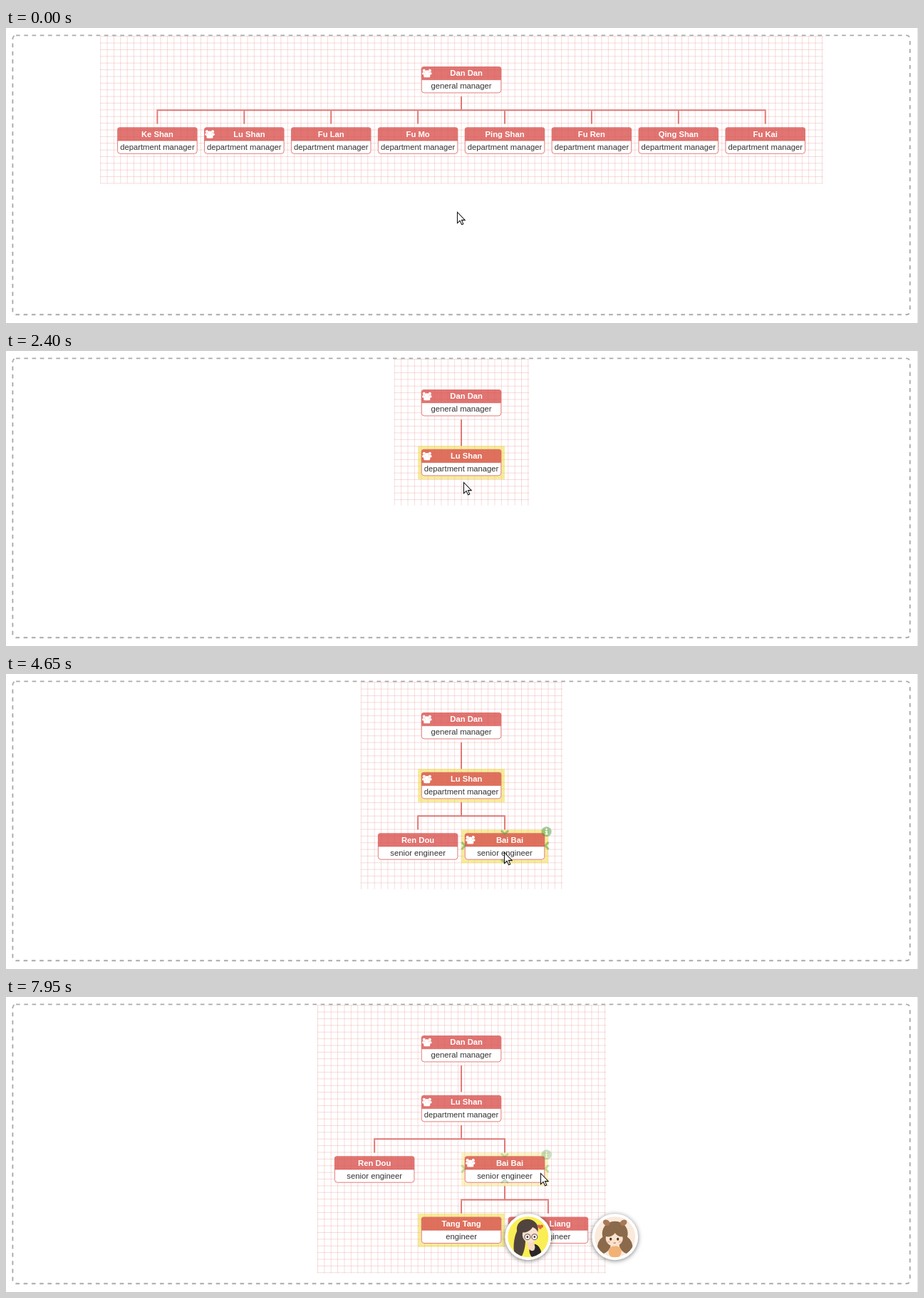
Write an HTML page with a canvas that moves like this. It is 1280 px wide and 414 px high and loops after 8000 ms.

```html
<!DOCTYPE html>
<html lang="en">
<head>
<meta charset="utf-8">
<title>Organisation chart</title>
<style>
html, body { margin: 0; width: 100%; height: 100%; overflow: hidden; background: #fff; }
canvas { display: block; }
</style>
</head>
<body>
<canvas id="stage" width="1280" height="414"></canvas>
<script>
const ctx = document.getElementById('stage').getContext('2d');
const SCALE = 1280 / 1365, LOOP = 8000, STEP = 50, TRAVEL = 250, FADE = 500;
// Chart sizes before scaling
const MID = 681.5, TOP = 12, COLUMN = 130, W = 120, H = 40, PAD = 5;
const RED = 'rgba(217,83,79,0.8)', GREEN = 'rgba(68,157,68,0.5)';

// clicked: time of focus, opened: children appear, info: portrait appears
const person = (name, role, kids = [], times = {}) =>
  ({ name, role, kids, clicked: Infinity, opened: Infinity, info: Infinity, ...times });

const tang = person('Tang Tang', 'engineer', [], { clicked: 7490, info: 7490, portrait: darkHair });
const liang = person('Liang Liang', 'UE engineer', [], { clicked: 6200, info: 6200, portrait: brownHair });
const bai = person('Bai Bai', 'senior engineer', [tang, liang], { clicked: 4840, opened: 4840 });
const lu = person('Lu Shan', 'department manager', [person('Ren Dou', 'senior engineer'), bai],
  { clicked: 1580, opened: 3440 });
const heads = ['Ke Shan', 'Lu Shan', 'Fu Lan', 'Fu Mo', 'Ping Shan', 'Fu Ren', 'Qing Shan', 'Fu Kai']
  .map(name => name === lu.name ? lu : person(name, 'department manager'));
const boss = person('Dan Dan', 'general manager', heads, { opened: -LOOP });
const HIDE = lu.clicked, HIDDEN = HIDE + 320;

// Pointer stops on the stage: arrival time, x, y
const stops = [
  [0, 633, 258], [600, 548, 240], [950, 390, 160], [2100, 430, 200], [2400, 642, 184],
  [2750, 641, 179], [3100, 640, 174], [4000, 690, 225], [4300, 699, 250], [5450, 796, 310],
  [6000, 817, 306], [6700, 715, 308], [7000, 697, 306], [7700, 699, 258], [7950, 750, 247]
];

const ramp = (t, a, b) => Math.max(0, Math.min(1, (t - a) / (b - a)));
const ease = p => 1 - (1 - p) ** 1.75;

function pointerAt(t) {
  let [, x, y] = stops[0];
  stops.slice(1).forEach(([arrive, toX, toY]) => {
    const p = ramp(t, arrive - TRAVEL, arrive);
    x += (toX - x) * p;
    y += (toY - y) * p;
  });
  return { x: x / SCALE, y: y / SCALE };
}

function kidsAt(n, t) {
  if (t < n.opened) return [];
  return n === boss && t >= HIDDEN ? [lu] : n.kids;
}

const span = (n, t) => Math.max(1, kidsAt(n, t).reduce((sum, k) => sum + span(k, t), 0));

// Lays out a subtree, children first, and collects nodes and connectors
function place(n, x, y, t, chart, alone = false, alpha = 1) {
  const kids = kidsAt(n, t), hiding = n === boss && t >= HIDE;
  const rowGap = hiding ? 89.5 : 91, show = ease(ramp(t, n.opened, n.opened + 200));
  const gone = hiding && kids.length > 1 ? ease(ramp(t, HIDE, HIDE + 300)) : 0;
  let left = x - span(n, t) * COLUMN / 2;
  const xs = kids.map((kid, i) => {
    const width = span(kid, t) * COLUMN, kidX = left + width / 2;
    left += width;
    const away = Math.sign(kids.indexOf(lu) - i) * COLUMN * gone;
    place(kid, kidX + away, y + rowGap - 40 * (1 - show), t, chart,
      kids.length === 1, kid === lu ? 1 : show * (1 - gone));
    return kidX;
  });
  if (xs.length && !(hiding && t < HIDDEN)) chart.lines.push({ x, y: y + H + PAD, xs });
  chart.bottom = Math.max(chart.bottom, y + 84);
  chart.nodes.push({ of: n, x, y, alone, alpha, open: t >= n.opened });
}

function chartAt(t) {
  const chart = { nodes: [], lines: [], bottom: 0 };
  place(boss, MID, 57.5, t, chart);
  chart.width = Math.max(202, span(boss, t) * COLUMN + 42);
  chart.focus = [lu, bai, liang, tang].findLast(n => t >= n.clicked);
  chart.nodes.sort((a, b) => (a.of === chart.focus) - (b.of === chart.focus));
  return chart;
}

// Replays the pointer up to t, so that each person's hover glow fades in and out
function hoverGlow(t) {
  const glow = new Map();
  for (let s = 0; s <= t; s += STEP) {
    const c = pointerAt(s);
    const { nodes } = chartAt(s);
    const over = nodes.findLast(n => Math.abs(c.x - n.x) < COLUMN / 2 && c.y > n.y - PAD && c.y < n.y + H + PAD);
    for (const n of nodes) {
      const change = (n === over ? STEP : -STEP) / FADE;
      glow.set(n.of, Math.max(0, Math.min(1, (glow.get(n.of) || 0) + change)));
    }
  }
  return glow;
}

function rect(x, y, w, h, fill) {
  ctx.fillStyle = fill;
  ctx.fillRect(x, y, w, h);
}

function oval(x, y, rx, ry, fill, turn = 0) {
  ctx.fillStyle = fill;
  ctx.beginPath();
  ctx.ellipse(x, y, rx, ry, turn, 0, 7);
  ctx.fill();
}

const dot = (x, y, r, fill) => oval(x, y, r, r, fill);

function text(str, x, y, fill, weight) {
  ctx.font = `${weight} 12px "Liberation Sans", Arial, sans-serif`;
  ctx.textAlign = 'center';
  ctx.fillStyle = fill;
  ctx.fillText(str, x, y);
}

function grid({ width, bottom }) {
  const left = Math.round(MID - width / 2), color = 'rgba(200,0,0,0.15)';
  for (let x = 0; x < width; x += 10) rect(left + x, TOP, 1, bottom - TOP, color);
  for (let y = TOP; y < bottom; y += 10) rect(left, y, width, 1, color);
}

function connector({ x, y, xs }) {
  if (xs.length === 1) return rect(x - 1, y, 2, 39.5, RED);
  rect(x - 1, y, 2, 19.5, RED);
  rect(xs[0] - 1, y + 19.5, xs.at(-1) - xs[0] + 2, 2, RED);
  xs.forEach(kidX => rect(kidX - 1, y + 21.5, 2, 19.5, RED));
}

function people(x, y) {
  for (const side of [-1, 1]) {
    dot(x + side * 4.3, y - 3.6, 2.2, '#fff');
    oval(x + side * 4.7, y + 0.6, 2.6, 2.1, '#fff');
  }
  dot(x, y - 1.4, 3, '#fff');
  ctx.beginPath();
  ctx.roundRect(x - 4.8, y + 1, 9.6, 5.4, [3, 3, 1.5, 1.5]);
  ctx.fill();
}

// A chevron pointing down, turned by quarter turns
function chevron(x, y, quarters, active) {
  ctx.save();
  ctx.translate(x, y);
  ctx.rotate(quarters * Math.PI / 2);
  ctx.strokeStyle = active ? '#449d44' : GREEN;
  ctx.lineWidth = 3;
  ctx.beginPath();
  ctx.moveTo(-5.3, -2.6);
  ctx.lineTo(0, 2.5);
  ctx.lineTo(5.3, -2.6);
  ctx.stroke();
  ctx.restore();
}

const near = (a, b) => Math.abs(a - b) < 6;
const onEdge = (n, c) => near(c.y, n.y) || near(c.y, n.y + H) || near(Math.abs(c.x - n.x), W / 2);

function controls(n, c) {
  const l = n.x - W / 2, r = n.x + W / 2, b = n.y + H, side = n.alone ? 1 : 3;
  chevron(n.x, n.y - 1, 0, near(c.y, n.y));
  chevron(l - 2, n.y + 19, side, near(c.x, l));
  chevron(r + 3, n.y + 19, 4 - side, near(c.x, r));
  if (n.of.kids.length) chevron(n.x, n.open ? b - 2 : b + 2, n.open ? 2 : 0, near(c.y, b));
  dot(r + 2.5, n.y - 2, 7.5, GREEN);
  rect(r + 1.3, n.y - 6.5, 2.4, 2.2, '#fff');
  rect(r + 0.5, n.y - 3.2, 3.2, 1.4, '#fff');
  rect(r + 1.3, n.y - 3.2, 2.4, 5, '#fff');
  rect(r + 0.3, n.y + 1, 4.4, 1.4, '#fff');
}

function box(x, y, h, radii, fill) {
  ctx.fillStyle = fill;
  ctx.beginPath();
  ctx.roundRect(x, y, W, h, radii);
  ctx.fill();
}

function card(n, glow, focused, c) {
  const x = n.x - W / 2, { name, role, kids } = n.of, yellow = focused ? 1 : glow;
  ctx.save();
  ctx.globalAlpha = n.alpha;
  if (yellow) rect(x - PAD, n.y - PAD, COLUMN, H + 2 * PAD, `rgba(238,217,54,${yellow / 2})`);
  box(x, n.y, 20, [4, 4, 0, 0], RED);
  box(x, n.y + 20, H - 20, [0, 0, 4, 4], '#fff');
  ctx.strokeStyle = RED;
  ctx.lineWidth = 1;
  ctx.beginPath();
  ctx.roundRect(x + 0.5, n.y + 20, W - 1, H - 20.5, [0, 0, 4, 4]);
  ctx.stroke();
  if (kids.length) people(x + 8.5, n.y + 10);
  text(name, n.x + (kids.length ? 7.5 : 0), n.y + 14.4, '#fff', 'bold');
  text(role, n.x, n.y + 33.6, '#333', 'normal');
  ctx.globalAlpha *= glow;
  if (glow) controls(n, c);
  ctx.restore();
}

function badge(n) {
  ctx.save();
  ctx.translate(n.x + 100, n.y + 30);
  ctx.scale(1 / SCALE, 1 / SCALE);
  ctx.save();
  ctx.shadowColor = 'rgba(0,0,0,0.5)';
  ctx.shadowBlur = 6;
  ctx.shadowOffsetY = 1;
  dot(0, 0, 32.5, '#fff');
  ctx.restore();
  ctx.beginPath();
  ctx.arc(0, 0, 28.5, 0, 7);
  ctx.clip();
  n.of.portrait();
  ctx.restore();
}

function brownHair() {
  const hair = '#8a6a4b';
  dot(0, 0, 30, '#faeadb');
  oval(0, -5, 18, 17, hair);
  oval(0, 21, 9, 9, '#f2b276');
  for (const s of [-1, 1]) {
    oval(s * 12, -20, 5, 4, '#a87858', s * -0.5);
    oval(s * 15, 11, 9, 13, hair, s * -0.4);
  }
  oval(-1, 2, 12, 11, '#fbe3cd');
  for (const s of [-1, 1]) {
    oval(s * 7, -7, 9, 6, hair, s * 0.5);
    oval(s * 5 - 1, 3, 1.6, 2, '#4d3626');
    oval(s * 8 - 1, 7, 2.3, 1.4, '#f6bfae');
  }
  rect(-2, 8, 3, 1, '#a05a4a');
}

function darkHair() {
  const hair = '#51443f';
  dot(0, 0, 30, '#faee55');
  oval(-1, -11, 15, 14, hair);
  oval(-12, 9, 8, 22, hair, 0.1);
  oval(10, 21, 8, 11, '#2b2729', -0.3);
  oval(4, 12, 5, 8, '#f7d8c4', -0.4);
  oval(3, -3, 11, 11, '#fbe1d0');
  oval(-3, -13, 10, 6, hair, -0.4);
  for (const x of [-1, 9]) {
    dot(x, 0, 4.5, '#5b5350');
    dot(x, 0, 3.5, '#fff3ea');
    dot(x, 0, 1.3, '#3a302d');
    dot(13.4 + x / 2.5 + 2, -15, 2.2, '#e26545');
  }
  oval(17, -13, 1.8, 2.2, '#e26545');
}

const arrow = new Path2D('M.5.5V16.8L4.3 13.2 7 19 9.4 18 6.9 12.4H12Z');
const hand = new Path2D('M-1.8 9.6V1.3Q-1.8-.6 0-.6T1.8 1.3V6.4Q3.6 5.3 4.9 7 6.7 6.2 7.7 7.9 10.2 7.3 10.2 10V14Q10.2 16 8.5 18V21H-1V18.5L-5.8 12.3Q-6.8 10.2-4.9 9.5-3.6 9.3-1.8 11.7Z');

function pointer(c, pointing) {
  const shape = pointing ? hand : arrow;
  ctx.save();
  ctx.translate(c.x, c.y);
  ctx.fillStyle = '#fff';
  ctx.strokeStyle = '#111';
  ctx.lineWidth = 1.1;
  ctx.fill(shape);
  ctx.stroke(shape);
  if (pointing) [1.8, 4.8, 7.7].forEach(x => rect(x - 0.5, 7, 1, 4, '#111'));
  ctx.restore();
}

function border() {
  ctx.strokeStyle = '#aaa';
  ctx.lineWidth = 2;
  ctx.setLineDash([6, 6]);
  ctx.beginPath();
  ctx.roundRect(10, 11, 1343, 418, 5);
  ctx.stroke();
  ctx.setLineDash([]);
  rect(1364, 0, 1, 442, '#e2e2e2');
}

function render(t) {
  const chart = chartAt(t), glow = hoverGlow(t), c = pointerAt(t);
  ctx.setTransform(SCALE, 0, 0, SCALE, 0, 0);
  rect(0, 0, 1365, 442, '#fff');
  grid(chart);
  border();
  chart.lines.forEach(connector);
  chart.nodes.forEach(n => card(n, glow.get(n.of), n.of === chart.focus, c));
  chart.nodes.filter(n => t >= n.of.info).forEach(badge);
  const over = chart.nodes.find(n => glow.get(n.of) > 0.15 && Math.abs(c.x - n.x) < COLUMN / 2 &&
    c.y > n.y - PAD && c.y < n.y + H + PAD);
  pointer(c, over && onEdge(over, c));
}

const start = performance.now();
let shown = -1;
function tick() {
  const t = Math.floor((performance.now() - start) % LOOP / STEP) * STEP;
  if (t !== shown) render(shown = t);
  requestAnimationFrame(tick);
}
tick();
</script>
</body>
</html>
```
